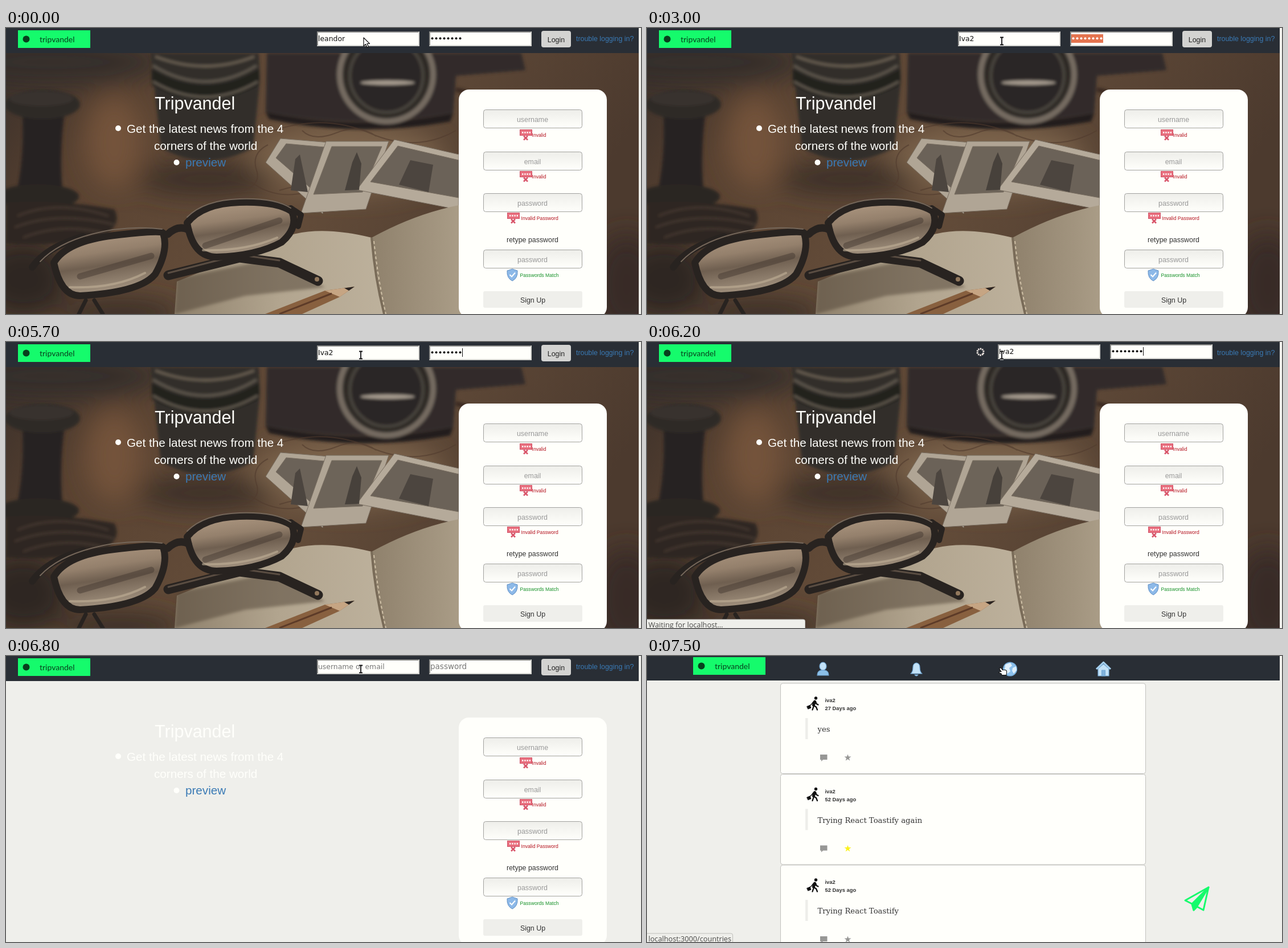
Animation of 1115 by 502 pixels, one loop 8 s. Source, as an HTML page:

```html
<!DOCTYPE html>
<html lang="en">
<head>
<meta charset="utf-8">
<title>Login</title>
<style>
  html, body { margin: 0; width: 100%; height: 100%; overflow: hidden; background: #fffffb; }
  svg { display: block; width: 1115px; height: 502px; }
  text { font: 12.4px "Liberation Sans", Arial, sans-serif; white-space: pre; }
  .mid { text-anchor: middle; }
  .big { font-size: 20.65px; fill: #fffffb; }
  .title { font-size: 30.5px; }
  .link { fill: #3a7ab5; }
  .hint { fill: #999; text-anchor: middle; }
  .small { font-size: 8.65px; }
  .bad { fill: #b4121f; }
  .typed { font: 12.4px "DejaVu Sans", Verdana, sans-serif; }
  .post { font: 13.2px "DejaVu Serif", serif; fill: #333; }
  .meta { font-size: 9.4px; font-weight: bold; fill: #333; }
  .status { font: 12.7px "Open Sans", "Noto Sans", sans-serif; fill: #4a4a48; }
  .brand { font: 14px Lato, sans-serif; fill: #08401d; }
</style>
</head>
<body>
<svg viewBox="0 0 1115 502" xmlns="http://www.w3.org/2000/svg">
  <defs>
    <clipPath id="stageClip"><rect y="44" width="1111" height="458"/></clipPath>
    <filter id="soft" x="-20%" y="-20%" width="140%" height="140%"><feGaussianBlur stdDeviation="2.5"/></filter>
    <filter id="haze" x="-40%" y="-40%" width="180%" height="180%"><feGaussianBlur stdDeviation="22"/></filter>
    <linearGradient id="table" x2="1" y2=".25">
      <stop offset="0" stop-color="#3b302a"/><stop offset=".2" stop-color="#594231"/>
      <stop offset=".55" stop-color="#644d3a"/><stop offset="1" stop-color="#4c3a2e"/>
    </linearGradient>
    <linearGradient id="paper" x2="1" y2="0">
      <stop offset="0" stop-color="#8f816c"/><stop offset=".5" stop-color="#b2a58f"/><stop offset="1" stop-color="#bdb19c"/>
    </linearGradient>
    <linearGradient id="glass" x2=".25" y2="1">
      <stop offset="0" stop-color="#b29c85"/><stop offset=".4" stop-color="#94806c"/>
      <stop offset=".6" stop-color="#6f5f50"/><stop offset="1" stop-color="#a39380"/>
    </linearGradient>
    <linearGradient id="inset" x2="0" y2="1">
      <stop offset="0" stop-color="#eeeeea"/><stop offset="1" stop-color="#fffffb"/>
    </linearGradient>
    <g id="box">
      <rect width="180" height="26" fill="#fffffb"/>
      <path d="M0 26V0H180L178 2H2V24Z" fill="#8d8d8b"/>
      <path d="M0 26L2 24H178V2L180 0V26Z" fill="#d6d6d2"/>
    </g>
    <g id="wrong">
      <rect x=".5" y=".5" width="21" height="10" fill="#e9707f" stroke="#cf5266"/>
      <path d="M4 5.500H19" stroke="#fff" stroke-width="2.400" stroke-dasharray="2.400 1.800"/>
      <path d="M7 11.500l7 7m0-7l-7 7" stroke="#d9566b" stroke-width="2.600"/>
    </g>
    <g id="brand">
      <rect width="127" height="31" fill="#15fb6c"/>
      <circle cx="14.500" cy="15.500" r="6" fill="#08401d"/>
      <text class="brand" x="38" y="21">tripvandel</text>
    </g>
    <g id="walker" fill="#111" stroke="#111" stroke-linecap="round" stroke-linejoin="round">
      <circle cx="16.500" cy="3" r="2.700" stroke="none"/>
      <path d="M14.500 9L12.500 15" stroke-width="5"/>
      <path d="M13 16L10.500 23.500M13 16L17 18.500L19 23.500M16 9L17.500 13L20.500 14.500" fill="none" stroke-width="2.300"/>
      <path d="M12 9.500L9 13.500L5 17" fill="none" stroke-width="1.500"/>
      <path d="M1 17.500L6 15.500L8 20L3 22Z" stroke-width="1"/>
    </g>
    <path id="star" d="M0 -6L1.500 -1.900H6L2.400 .8L3.700 5.200L0 2.500L-3.700 5.200L-2.400 .8L-6 -1.900H-1.500Z"/>
  </defs>

  <rect id="paperBg" width="1115" height="502"/>

  <g id="login">
    <g id="photo" clip-path="url(#stageClip)">
      <rect y="44" width="1111" height="458" fill="url(#table)"/>
      <g filter="url(#haze)">
        <ellipse cx="190" cy="200" rx="50" ry="80" fill="#73533b"/>
        <ellipse cx="600" cy="230" rx="170" ry="60" fill="#7b634c"/>
        <ellipse cx="80" cy="60" rx="200" ry="42" fill="#352e2a"/>
        <ellipse cx="350" cy="265" rx="120" ry="28" fill="#3a2e26"/>
        <ellipse cx="30" cy="440" rx="80" ry="70" fill="#2f2824"/>
        <ellipse cx="200" cy="500" rx="110" ry="25" fill="#3a2d25"/>
        <ellipse cx="1090" cy="450" rx="60" ry="90" fill="#382c25"/>
      </g>
      <g filter="url(#soft)">
        <path d="M28 140H104Q92 220 100 292H18Q34 220 28 140Z" fill="#282422"/>
        <ellipse cx="64" cy="134" rx="66" ry="26" fill="#2d2927"/>
        <ellipse cx="62" cy="124" rx="56" ry="13" fill="#39332f"/>
        <ellipse cx="56" cy="296" rx="72" ry="22" fill="#2a2522"/>
        <path d="M0 306Q90 300 190 318Q205 345 170 366Q80 385 0 378Z" fill="#2d2723"/>
        <path d="M20 330Q90 300 180 330M15 350Q90 320 190 345M30 368Q100 340 180 362" fill="none" stroke="#463a31" stroke-width="3"/>
        <path d="M254 44H444L446 90L434 210Q350 255 272 210Z" fill="#302d2a"/>
        <path d="M256 72Q350 128 444 72L444 100Q350 152 256 100Z" fill="#24221f"/>
        <path d="M258 66Q350 122 440 66M258 94Q350 148 442 94" fill="none" stroke="#625a50" stroke-width="4"/>
        <path d="M262 50Q350 84 436 50" fill="none" stroke="#6e6355" stroke-width="4"/>
        <path d="M458 44H905L912 74L790 84L785 150Q620 180 456 148Z" fill="#302c29"/>
        <path d="M456 148Q620 182 785 150L780 164Q620 194 462 160Z" fill="#231f1c"/>
        <path d="M790 108Q850 120 880 160" fill="none" stroke="#3a2c24" stroke-width="8"/>
        <circle cx="668" cy="82" r="82" fill="#2e2a27" stroke="#746b60" stroke-width="10"/>
        <circle cx="668" cy="84" r="64" fill="#2b2825" stroke="#4a443e" stroke-width="5"/>
        <ellipse cx="670" cy="96" rx="48" ry="4" fill="#a49a8d"/>
      </g>
      <path d="M470 180Q560 150 640 185T790 180M480 285Q560 260 600 300M430 270Q470 300 520 290M460 205Q430 220 440 250T400 290M520 180Q540 200 580 184T650 190" fill="none" stroke="#503b2d" stroke-width="2" opacity=".6"/>
      <g stroke="#796e61">
        <path d="M482 194L580 202L556 326L456 236Z" fill="#b0a595"/>
        <path d="M492 203L570 210L552 296L474 228Z" fill="#6b6258"/>
        <path d="M562 199L672 199L632 318L518 325Z" fill="#b0a595"/>
        <path d="M572 208L660 208L626 288L540 292Z" fill="#6d6459"/>
        <path d="M682 196L795 222V319L616 284Z" fill="#b5aa9a"/>
        <path d="M688 207L795 232V298L640 270Z" fill="#6b6258"/>
      </g>
      <path d="M595 285L608 236L616 218L624 238L620 284Z" fill="#47413b"/>
      <path d="M500 285L508 230L516 222L530 288ZM690 275L710 232L750 240L742 288Z" fill="#4c453f"/>
      <path d="M296 502L300 445L505 362Q560 348 642 368L664 502Z" fill="url(#paper)"/>
      <path d="M642 368Q720 325 800 310L1050 330V502H664Z" fill="url(#paper)"/>
      <path d="M642 368Q648 440 664 502" fill="none" stroke="#796b58" stroke-width="4"/>
      <path d="M646 374Q653 440 667 502" fill="none" stroke="#cfc0a6" stroke-width="2" stroke-dasharray="5 4"/>
      <path d="M296 502L300 440L470 405L560 455L420 470Z" fill="#4f4234" opacity=".5" filter="url(#soft)"/>
      <g fill="none" stroke="#282320" stroke-linecap="round" stroke-linejoin="round">
        <path d="M285 434L410 403L480 412L548 444" stroke-width="17"/>
        <path d="M285 430L410 398L480 408" stroke="#5a4d42" stroke-width="3"/>
        <path d="M140 478L128 502M155 478L170 502" stroke-width="7"/>
        <path d="M46 420Q70 385 135 366" stroke-width="12"/>
        <path d="M84 412Q106 374 190 364T276 360Q286 390 262 432Q236 464 130 470Q96 470 84 412Z" stroke-width="12" fill="url(#glass)"/>
        <path d="M318 342Q345 308 410 306T502 322Q514 350 484 376Q440 400 370 402Q328 402 318 342Z" stroke-width="12" fill="url(#glass)"/>
        <path d="M284 362Q302 345 320 354" stroke-width="13"/>
        <path d="M500 316L518 328L513 348" stroke-width="10"/>
        <path d="M60 410Q90 378 150 362T274 353M318 332Q348 302 410 300T500 316" stroke="#75675a" stroke-width="2"/>
        <path d="M130 436L255 400M350 382L480 338" stroke="#463a32" stroke-width="11" opacity=".5"/>
        <path d="M112 455Q190 458 244 430M346 390Q420 392 476 368" stroke="#c2b198" stroke-width="4" opacity=".6"/>
      </g>
      <circle cx="546" cy="441" r="4" fill="#92785c"/>
      <path d="M455 502L560 461L612 454L586 472L520 502Z" fill="#88603f"/>
      <path d="M560 461L612 454L586 472Z" fill="#c6a583"/>
      <path d="M594 456.500L612 454L602 461Z" fill="#2a2421"/>
      <path d="M480 502L572 466" stroke="#5d3b28" stroke-width="3"/>
    </g>
    <text class="big title" x="261" y="143">Tripvandel</text>
    <circle cx="197" cy="176" r="5" fill="#fffffb"/>
    <text class="big" x="212" y="184">Get the latest news from the 4</text>
    <text class="big" x="260" y="214">corners of the world</text>
    <circle cx="299.500" cy="236" r="5" fill="#fffffb"/>
    <text class="big" x="315" y="243" style="fill:#3a7ab5">preview</text>

    <rect x="795" y="108" width="260" height="400" rx="18" fill="#fffffb"/>
    <g id="signup"></g>
    <use href="#wrong" x="902" y="178"/>
    <text class="small bad" x="923.500" y="191">Invalid</text>
    <use href="#wrong" x="902" y="251"/>
    <text class="small bad" x="923.500" y="264">Invalid</text>
    <use href="#wrong" x="880" y="324"/>
    <text class="small bad" x="904.500" y="337">Invalid Password</text>
    <text class="mid" x="924.500" y="376" fill="#333">retype password</text>
    <path d="M889 423L898 426Q899 439 889 444Q879 439 880 426Z" fill="#8db9e8" stroke="#5f8fc4"/>
    <path d="M884.500 433L888 436.500L894 429.500" fill="none" stroke="#fff" stroke-width="2"/>
    <text class="small" x="902.500" y="437" fill="#159128">Passwords Match</text>
    <rect x="838" y="462" width="174" height="29" rx="3" fill="#efefeb"/>
    <text class="mid" x="925" y="481.500" fill="#333">Sign Up</text>

    <rect width="1111" height="44" fill="#292e35"/>
    <use href="#brand" x="21" y="4"/>
    <g id="fields">
      <use href="#box" x="546" y="6"/>
      <use href="#box" x="743" y="6"/>
      <rect id="userSel" x="547.500" y="10" height="16" fill="#e4744f"/>
      <rect id="passSel" x="745" y="11" width="56" height="15" fill="#e4744f"/>
      <text id="user" class="typed" x="548" y="22.500"></text>
      <g id="dots"></g>
      <g id="empty" fill="#777">
        <text class="typed" x="548" y="22.500">username or email</text>
        <text class="typed" x="745" y="22.500" style="font-size:13.500px">password</text>
      </g>
      <rect id="caret" y="11" width="1" height="15" fill="#111"/>
    </g>
    <g id="button">
      <rect x="940" y="5" width="52" height="29" rx="4" fill="#d3d3d1"/>
      <text class="mid" x="966" y="24.500" fill="#222">Login</text>
    </g>
    <circle id="spinner" cx="585.500" cy="17.500" r="5.500" fill="none" stroke="#f3e9e4" stroke-width="3" stroke-dasharray="2.300 1.156"/>
    <text class="link" x="1001" y="22.500">trouble logging in?</text>
  </g>

  <g id="feed">
    <g id="posts"></g>
    <rect width="1111" height="43" fill="#292e35"/>
    <use href="#brand" x="81" y="2"/>
    <g fill="#c3e2f8" stroke="#72a8d5" stroke-width="1.200" stroke-linejoin="round">
      <path d="M299 34Q299 26 306 25H312Q319 26 319 34Z" fill="#8bbfe8"/>
      <ellipse cx="309" cy="18" rx="6" ry="7"/>
      <path d="M463 31Q467 28 467 20Q467 13 473 12Q479 13 479 20Q479 28 483 31Z"/>
      <path d="M470 33H476Q473 37 470 33Z"/>
      <circle cx="637.500" cy="23" r="12" fill="#8cc0ec"/>
      <path d="M629 15L638 12L641 17L636 21L638 27L633 31L628 25ZM642 21L648 18L649 25L644 31L641 26Z" stroke="none" fill="#e0f0fb"/>
      <path d="M792 22V35H811V22L801.500 14Z"/>
      <path d="M789 23L801.500 11L814 23" fill="none" stroke="#a5d0f0" stroke-width="3"/>
      <path d="M798.500 35V25H804.500V35Z" fill="#7fb2dc"/>
    </g>
    <g fill="none" stroke="#15fb6c" stroke-width="3" stroke-linejoin="round">
      <path d="M986 406L945 429L957 435L960 446L966 440L977 446Z"/>
      <path d="M986 406L957 435L960 446L966 439Z" fill="#15fb6c"/>
    </g>
  </g>

  <g id="status">
    <rect id="statusBox" x="-4" y="487" height="22" rx="3" fill="#efefeb" stroke="#bdbdb9"/>
    <text id="statusText" class="status" x="2.500" y="501"></text>
  </g>

  <path id="arrow" d="M0 0V14.500L3.500 11.500L6 17L8.500 16L6 10.500H10.500Z" fill="#fff" stroke="#111" stroke-width="1.200" stroke-linejoin="round"/>
  <g id="beam" fill="none">
    <path d="M-3 -6.500H3M0 -6.500V6.500M-3 6.500H3" stroke="#fff" stroke-width="4"/>
    <path d="M-3 -6.500H3M0 -6.500V6.500M-3 6.500H3" stroke="#111" stroke-width="1.800"/>
  </g>
  <path id="hand" d="M1 1.500Q3 0 4.500 2L6 4.500H11Q14 5 13.500 9L13 13.500H5L4 11L0 9.500Q0 7.500 4 7.500L1 3Z" fill="#fff" stroke="#111" stroke-width="1.100"/>
</svg>

<script>
const LOOP = 8000;
const $ = id => document.getElementById(id);
const show = (id, on) => $(id).setAttribute('display', on ? 'inline' : 'none');
const set = (id, attrs) => { for (const k in attrs) $(id).setAttribute(k, attrs[k]); };

$('signup').innerHTML = [[143, 'username'], [217, 'email'], [290, 'password'], [389, 'password']]
  .map(([y, label]) => `<rect x="838.500" y="${y + .5}" width="173" height="32" rx="4" fill="url(#inset)" stroke="#a2a29f"/>
    <text class="hint" x="924.500" y="${y + 21.5}">${label}</text>`).join('');

$('dots').innerHTML = Array.from({ length: 8 }, (_, i) =>
  `<circle cx="${748.5 + 7 * i}" cy="18.300" r="2"/>`).join('');

const posts = [[27, 'yes', '#979795'], [52, 'Trying React Toastify again', '#fbf21c'], [52, 'Trying React Toastify', '#979795']];
$('posts').innerHTML = posts.map(([days, text, star], i) => `<g transform="translate(0 ${159.5 * i})">
  <rect x="234.500" y="48" width="641" height="158.500" rx="4" fill="#fffffb" stroke="#c2c2be"/>
  <use href="#walker" x="280" y="71"/>
  <text class="meta" x="312.500" y="81">iva2</text>
  <text class="meta" x="312.500" y="95">${days} Days ago</text>
  <rect x="278" y="109" width="4.500" height="37" fill="#eeeeea"/>
  <text class="post" x="299.500" y="133">${text}</text>
  <path d="M304 173H316.500V182H309L306 185V182H304Z" fill="#979795"/>
  <use href="#star" x="352.500" y="178.500" fill="${star}"/></g>`).join('');

// Each step changes part of the state from its time on.
const steps = [
  [0, { page: 'login', photo: true, cursor: ['arrow', 628, 17], user: 'leandor', dots: 8,
        select: '', caret: '', wait: false, spin: 0, status: '', posts: false }],
  [100, { cursor: ['beam', 623, 19] }],
  [200, { cursor: ['beam', 623, 11] }],
  [400, { cursor: ['beam', 623, 17] }],
  [500, { cursor: ['beam', 623, 23] }],
  [700, { caret: 'pass' }],
  [800, { caret: 'user' }],
  [1100, { select: 'user', caret: '' }],
  [1800, { select: '', user: 'I', caret: 'user' }],
  [2100, { user: 'Iv' }],
  [2400, { user: 'Iva' }],
  [2700, { user: 'Iva2' }],
  [3000, { select: 'pass', caret: '' }],
  [4000, { select: '', dots: 1, caret: 'pass' }],
  ...[4200, 4500, 4700, 4900, 5200, 5500, 5700].map((t, i) => [t, { dots: i + 2 }]),
  [6000, { wait: true }],
  [6100, { spin: 20, status: 'Waiting for localhost…' }],
  [6200, { spin: 40 }],
  [6400, { page: 'white', cursor: ['arrow', 621, 21], status: 'Transferring data from localhost…' }],
  [6700, { page: 'login', photo: false, wait: false, user: '', dots: 0, caret: '', status: '' }],
  [6800, { cursor: ['beam', 623, 23] }],
  [6900, { page: 'feed', cursor: ['hand', 618, 20], status: 'localhost:3000/countries' }],
  [7100, { posts: true }]
];

function draw(t) {
  const s = Object.assign({}, ...steps.filter(step => step[0] <= t).map(step => step[1]));
  set('paperBg', { fill: s.page === 'white' ? '#fffffb' : '#efefeb' });
  show('login', s.page === 'login');
  show('feed', s.page === 'feed');
  show('photo', s.photo);
  show('posts', s.posts);

  $('user').textContent = s.user;
  const width = s.page === 'login' ? $('user').getComputedTextLength() : 0;
  set('user', { fill: s.select === 'user' ? '#fff' : '#111' });
  set('userSel', { width: width + 1 });
  show('userSel', s.select === 'user');
  show('passSel', s.select === 'pass');
  set('dots', { fill: s.select === 'pass' ? '#fff' : '#111' });
  [...$('dots').children].forEach((dot, i) => dot.setAttribute('display', i < s.dots ? 'inline' : 'none'));
  show('empty', !s.user);
  show('caret', s.caret);
  set('caret', { x: Math.round(s.caret === 'user' ? 547.5 + width : 745 + 7 * s.dots) });

  set('fields', { transform: s.wait ? 'translate(70 -2)' : '' });
  show('button', !s.wait);
  show('spinner', s.wait);
  set('spinner', { transform: `rotate(${s.spin} 585.5 17.5)` });

  show('status', s.status);
  $('statusText').textContent = s.status;
  set('statusBox', { width: s.page === 'feed' ? 154.5 : 281.5 });

  const [kind, x, y] = s.cursor;
  for (const id of ['arrow', 'beam', 'hand']) show(id, id === kind);
  set(kind, { transform: `translate(${x} ${y})` });
}

const start = performance.now();
function tick() {
  draw((performance.now() - start) % LOOP);
  requestAnimationFrame(tick);
}
tick();
</script>
</body>
</html>
```
